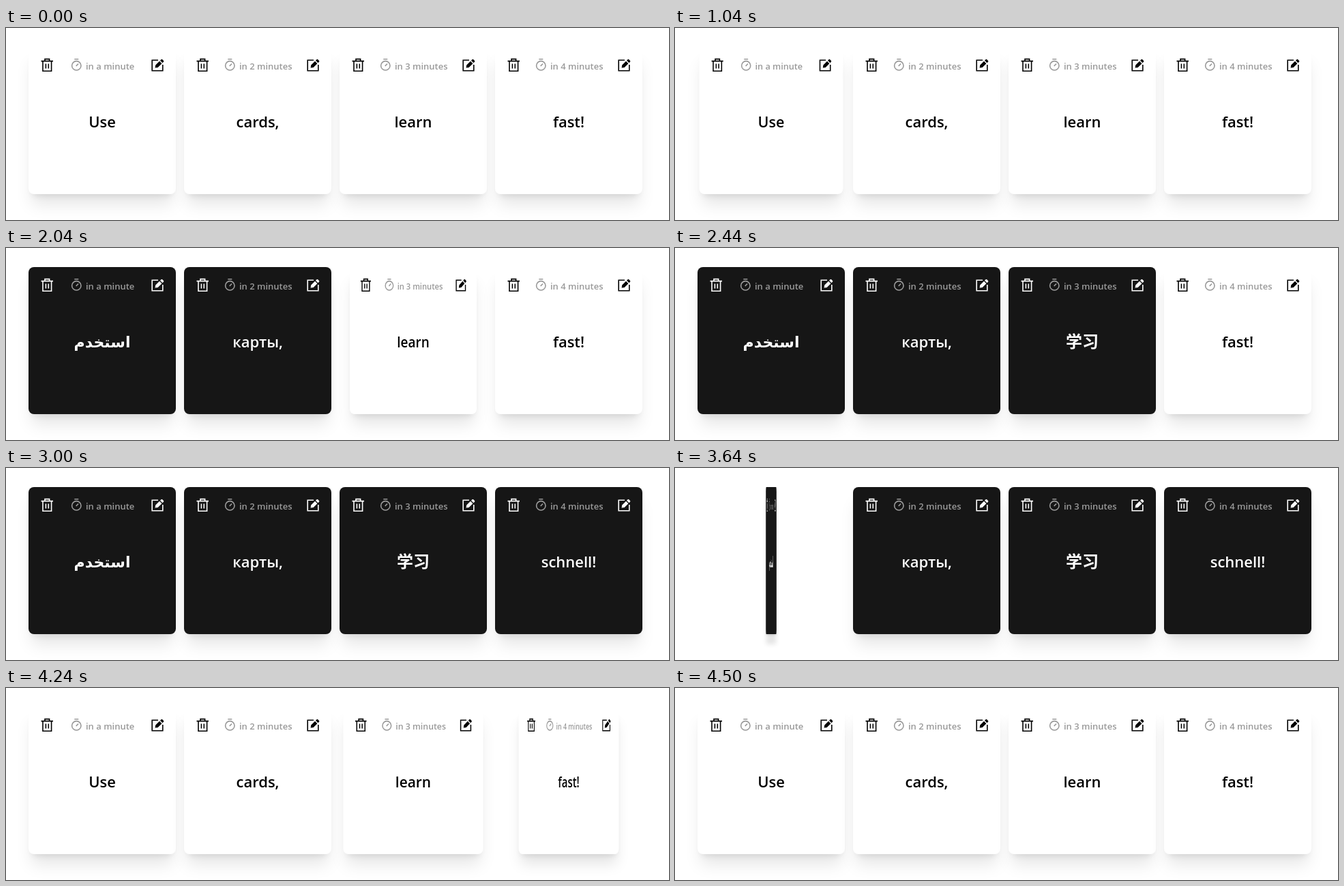
Animation of 972 by 282 pixels, one loop 4.52 s. Source, as an HTML page:

```html
<!DOCTYPE html>
<html lang="en">
<head>
<meta charset="utf-8">
<title>Flash cards</title>
<style>
html, body { margin: 0; width: 100%; height: 100%; overflow: hidden; background: #fff; }
.card {
  position: absolute; top: 28px; width: 216px; height: 216px;
  border-radius: 8px; background: #fff; color: #000;
  box-shadow: 0 20px 25px -5px rgba(0,0,0,.1), 0 8px 10px -6px rgba(0,0,0,.1);
}
.card.dark { background: #161616; color: #fff; }
svg { display: block; fill: none; stroke: currentColor; stroke-width: 1.6; }
text { stroke: none; font-family: "Open Sans", "Noto Sans", "DejaVu Sans", "Noto Sans CJK SC", sans-serif; font-weight: 600; }
.word { font-size: 22px; fill: currentColor; text-anchor: middle; }
.word.han { font-size: 24px; font-weight: 700; font-family: "Noto Sans CJK SC", "Noto Sans CJK", sans-serif; }
.due { font-size: 13px; fill: #9a9a9a; }
.clock { stroke: #9a9a9a; }
</style>
</head>
<body>
<script>
const LOOP = 4520, FLIP = 500;
const cards = [
  { front: "Use", back: "استخدم", due: "in a minute", dueX: 84, there: 1000, home: 3500 },
  { front: "cards,", back: "карты,", due: "in 2 minutes", dueX: 81, there: 1390, home: 3640 },
  { front: "learn", back: "学习", due: "in 3 minutes", dueX: 81, there: 1970, home: 3930 },
  { front: "fast!", back: "schnell!", due: "in 4 minutes", dueX: 81, there: 2550, home: 4020 }
];

const markup = c => `<svg width="216" height="216">
  <path d="M18.5 20.6h17.5M24 20v-2.4h6.6v2.4M21 21v14.2h12.6v-14.2M25.4 24.5v7M29.3 24.5v7"/>
  <g class="clock" transform="translate(${c.dueX - 13.7} 27.3)">
    <circle r="6.7"/><path d="M-3 -9.6h6M-.6 .6L2.8 -2.8"/>
  </g>
  <path d="M190 19.2h-8.8v15.6h15.6v-8.8"/>
  <path d="M185.6 30.6l.6-4 5.8-5.8 3.4 3.4-5.8 5.8zM193 19.8l1.8-1.8h1.2l2.2 2.2v1.2l-1.8 1.8z" fill="currentColor" stroke="none"/>
  <text class="due" x="${c.dueX}" y="33">${c.due}</text>
  <text class="word" x="108" y="118"></text>
</svg>`;

cards.forEach((c, i) => {
  c.el = document.createElement("div");
  c.el.className = "card";
  c.el.style.left = 33 + 228 * i + "px";
  c.el.innerHTML = markup(c);
  c.word = c.el.querySelector(".word");
  document.body.append(c.el);
});

// cubic-bezier(.25, .1, .25, 1)
function ease(x) {
  if (x <= 0) return 0;
  if (x >= 1) return 1;
  let lo = 0, hi = 1, s;
  const at = (a, b) => 3 * s * (1 - s) * ((1 - s) * a + s * b) + s ** 3;
  for (let i = 0; i < 24; i++) {
    s = (lo + hi) / 2;
    if (at(.25, .25) < x) lo = s; else hi = s;
  }
  return at(.1, 1);
}

function draw(now) {
  let t = now % LOOP;
  if (t > 1480 && t < 1580) t = 1480; // short stall
  for (const c of cards) {
    const turn = ease((t - c.there) / FLIP) - ease((t - c.home) / FLIP);
    const width = Math.cos(Math.PI * turn), dark = width < 0;
    c.el.style.transform = Math.abs(width) > .9995 ? "none" : `scaleX(${Math.abs(width)})`;
    c.el.classList.toggle("dark", dark);
    c.word.classList.toggle("han", dark && c.back === "学习");
    const word = dark ? c.back : c.front;
    if (c.word.textContent !== word) c.word.textContent = word;
  }
}

const start = performance.now();
function tick() {
  draw(performance.now() - start);
  requestAnimationFrame(tick);
}
tick();
</script>
</body>
</html>
```
